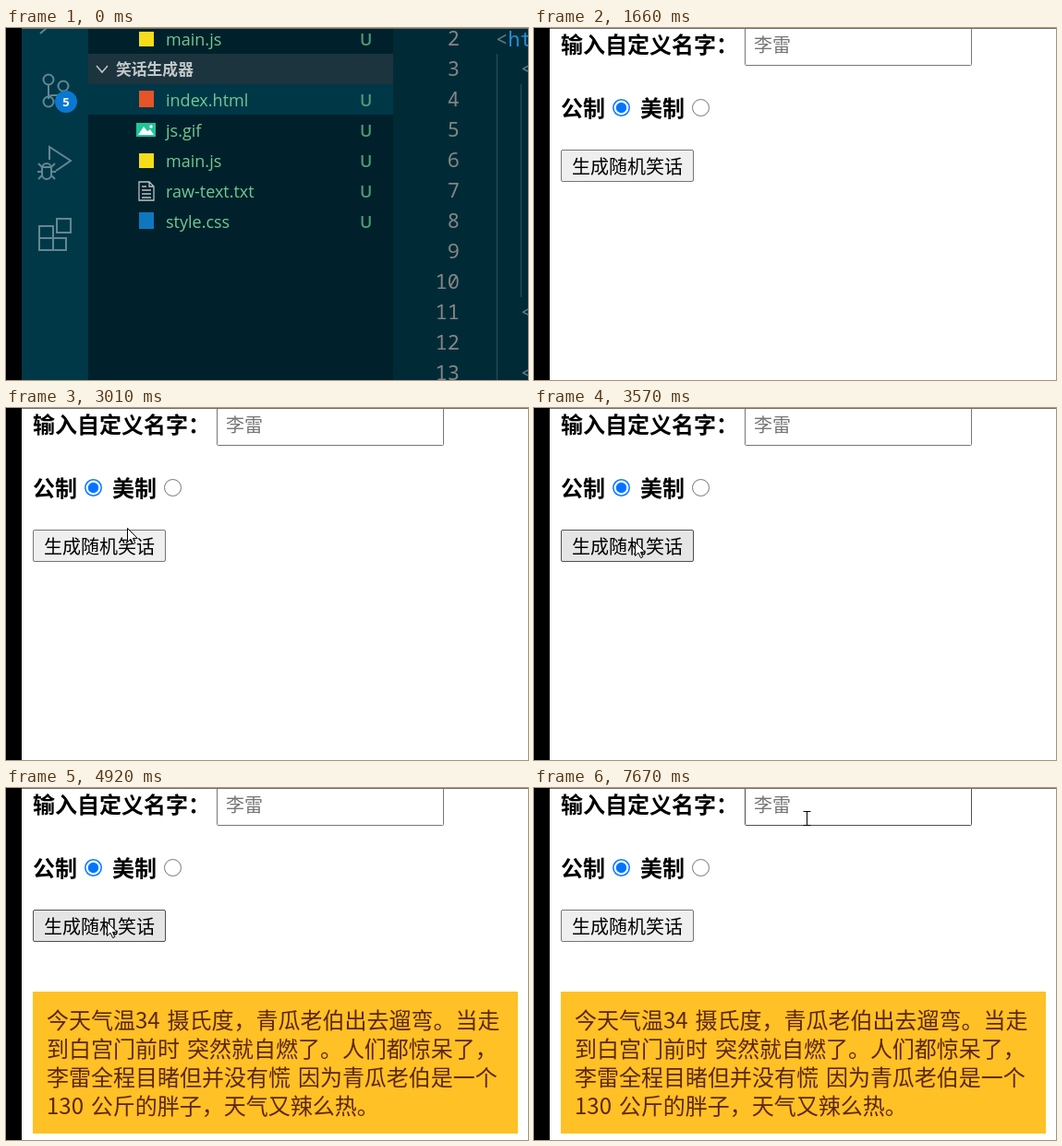
These frames come from a looping animation (565 px wide and 382 px high, 8000 ms). An HTML page:

```html
<!DOCTYPE html>
<html lang="zh-CN">
<head>
<meta charset="utf-8">
<title>笑话生成器</title>
<style>
html, body { margin: 0; width: 100%; height: 100%; overflow: hidden; background: #fff; }
svg { display: block; }
text { white-space: pre; font-family: "Noto Sans CJK SC", "Noto Sans CJK", sans-serif; }
.files text { font: 18px "Open Sans", sans-serif; fill: #73c991; }
.files .status { fill: #4f9b74; font-weight: 600; }
.code text { font: 22px "Noto Sans Mono", monospace; }
.num { fill: #858585; text-anchor: end; }
.tag { fill: #657b83; }
.guide { stroke: #2b5059; }
.tools { fill: none; stroke: #638791; stroke-width: 2; }
.label { font-size: 24px; font-weight: 700; }
.field { font-size: 20px; }
.joke { font-size: 24px; fill: #5e2612; word-spacing: 2.5px; }
#button { fill: #efefef; stroke: #767676; }
#button.hover { fill: #e5e5e5; stroke: #4f4f4f; }
#button.pressed { fill: #f5f5f5; stroke: #8d8d8d; }
#input { fill: #fff; stroke: #767676; }
#input.hover { stroke: #4f4f4f; }
</style>
</head>
<body>
<svg width="565" height="382" viewBox="0 0 565 382">
  <g id="editor">
    <rect width="565" height="382" fill="#002b36"/>
    <rect x="17" width="72" height="382" fill="#003847"/>
    <rect x="89" width="330" height="382" fill="#00212b"/>
    <rect x="89" y="28" width="330" height="33" fill="#1c343d"/>
    <rect x="89" y="61" width="330" height="33" fill="#003747"/>

    <g class="tools">
      <path d="M37 6L44 0"/>
      <circle cx="46" cy="56" r="5.5"/><circle cx="62" cy="63" r="5.5"/><circle cx="46" cy="80" r="5.5"/>
      <path d="M46 62V74M62 69Q61 73 56 73H51Q46 73 46 77"/>
      <path d="M47 143V129L70 144L54 155"/>
      <rect x="39" y="147" width="10" height="17" rx="5"/>
      <path d="M35 147L39 151H49L53 147M34 156H39M49 156H54M35 164L39 160M49 160L53 164"/>
      <path d="M36 215H51V241H36ZM36 228H65V241H51M55 207H70V222H55Z"/>
    </g>
    <circle cx="65" cy="80" r="12" fill="#0a78d1"/>
    <text x="65" y="85" text-anchor="middle" fill="#fff" style="font:bold 13px 'Open Sans',sans-serif">5</text>

    <path d="M98 41L104 48L110 41" fill="none" stroke="#c5c5c5" stroke-width="1.5"/>
    <text x="119" y="51" font-size="16.8" font-weight="700" fill="#c3c8ca">笑话生成器</text>

    <g class="files" id="files"></g>
    <rect x="144" y="4" width="16" height="16" fill="#f5de19"/>
    <rect x="144" y="68" width="16" height="18" fill="#e65428"/>
    <rect x="141" y="103" width="21" height="15" fill="#22c49a"/>
    <path d="M143 116L149 107L153 112L156 110L160 116Z" fill="#fff"/>
    <circle cx="157" cy="107" r="1.7" fill="#fff"/>
    <rect x="144" y="136" width="16" height="16" fill="#f5de19"/>
    <path d="M144 167H155L160 172V187H144ZM155 167V172H160M147 172H152M147 176H157M147 180H157M147 184H157" fill="none" stroke="#b9c3c6" stroke-width="1.3"/>
    <rect x="144" y="200" width="16" height="18" fill="#0f77c0"/>

    <g class="code" id="code">
      <path class="guide" d="M531.5 28V382M557.5 61V292"/>
      <text class="tag" x="530" y="20">&lt;<tspan fill="#268bd2">ht</tspan></text>
    </g>
  </g>

  <rect id="blank" width="565" height="382" fill="#fff"/>
  <g id="page">
    <text class="label" x="29" y="26.5">输入自定义名字：</text>
    <rect id="input" x="228.5" y="-4.5" width="245" height="45" rx="1"/>
    <text class="field" x="238" y="26" fill="#757575">李雷</text>
    <text class="label" x="29" y="96.4">公制</text>
    <circle cx="94.5" cy="86.5" r="8.7" fill="#fff" stroke="#0075ff" stroke-width="1.5"/>
    <circle cx="94.5" cy="86.5" r="5.7" fill="#0075ff"/>
    <text class="label" x="115" y="96.4">美制</text>
    <circle cx="180.5" cy="86.5" r="9" fill="#fff" stroke="#767676"/>
    <rect id="button" x="29.5" y="132.5" width="143" height="34" rx="1.5"/>
    <text class="field" x="41" y="158">生成随机笑话</text>
  </g>
  <g id="result" class="joke">
    <rect x="29" y="221" width="525" height="154" fill="#ffc125"/>
  </g>
  <path id="arrow" d="M.5.5V15.5L4 12.2L6.6 17.6L8.8 16.6L6.4 11.4H11.2Z" fill="#fff" stroke="#000"/>
  <path id="beam" d="M-3.5-7.5H4.5M.5-7.5V7.5M-3.5 7.5H4.5" fill="none" stroke="#000"/>
  <rect width="17" height="382"/>
  <rect x="17" width="548" height="1" fill="#707070"/>
</svg>
<script>
const LOOP = 8000, PAGE_BLANK = 690, PAGE_READY = 1120, PRESS = 4800, RELEASE = 4920;
const STEP = 137, FIRST_STEP = 650; // the pointer moves in even ticks
const $ = id => document.getElementById(id);
const show = (id, on) => $(id).style.display = on ? '' : 'none';

function addText(parent, x, y, string, cls = '') {
  const el = document.createElementNS('http://www.w3.org/2000/svg', 'text');
  el.setAttribute('x', x);
  el.setAttribute('y', y);
  el.setAttribute('class', cls);
  el.textContent = string;
  $(parent).append(el);
}

const rowY = row => 19 + 33 * row;
['main.js', '', 'index.html', 'js.gif', 'main.js', 'raw-text.txt', 'style.css'].forEach((name, row) => {
  if (!name) return;
  addText('files', 173, rowY(row), name);
  addText('files', 383, rowY(row), 'U', 'status');
});
for (let n = 2; n <= 13; n++) addText('code', 491, rowY(n - 2), n, 'num');
for (const n of [3, 11, 13]) addText('code', 557, rowY(n - 2), '<', 'tag');
[
  '今天气温34 摄氏度，青瓜老伯出去遛弯。当走',
  '到白宫门前时 突然就自燃了。人们都惊呆了，',
  '李雷全程目睹但并没有慌 因为青瓜老伯是一个',
  '130 公斤的胖子，天气又辣么热。'
].forEach((line, i) => addText('result', 44, 260.7 + 31.2 * i, line));

// Pointer turning points: tick, x, y
const turns = [
  [2, 552, 274], [5, 424, 198], [7, 426, 201], [8, 412, 277], [10, 367, 247],
  [13, 334, 175], [17, 131, 130], [18, 106, 160], [21, 109, 145], [36, 109, 145],
  [39, 178, 139], [41, 230, 85], [43, 268, 46], [44, 268, 46], [45, 205, 76],
  [48, 271, 46], [51, 295, 33]
];
const missed = [7, 19]; // ticks on which the pointer drops out

function pointerAt(tick) {
  const next = turns.findIndex(turn => turn[0] > tick);
  if (next < 0) return turns.at(-1).slice(1);
  const b = turns[next], a = turns[next - 1] || b;
  const part = a === b ? 0 : (tick - a[0]) / (b[0] - a[0]);
  return [1, 2].map(i => Math.round(a[i] + (b[i] - a[i]) * part));
}

function draw(t) {
  const tick = Math.floor((t - FIRST_STEP) / STEP);
  const [x, y] = pointerAt(tick);
  const visible = tick >= turns[0][0] && !missed.includes(tick);
  const overButton = x >= 29 && x < 173 && y >= 132 && y < 167;
  const overInput = x >= 228 && x < 474 && y < 41;
  const pressed = t >= PRESS && t < RELEASE;

  show('editor', t < PAGE_BLANK);
  show('blank', t >= PAGE_BLANK);
  show('page', t >= PAGE_READY);
  show('result', t >= RELEASE);
  show('arrow', visible && !overInput);
  show('beam', visible && overInput);
  for (const id of ['arrow', 'beam']) $(id).setAttribute('transform', `translate(${x} ${y})`);
  $('button').setAttribute('class', pressed ? 'pressed' : overButton ? 'hover' : '');
  $('input').setAttribute('class', overInput ? 'hover' : '');
}

const start = performance.now();
function frame() {
  draw((performance.now() - start) % LOOP);
  requestAnimationFrame(frame);
}
frame();
</script>
</body>
</html>
```
